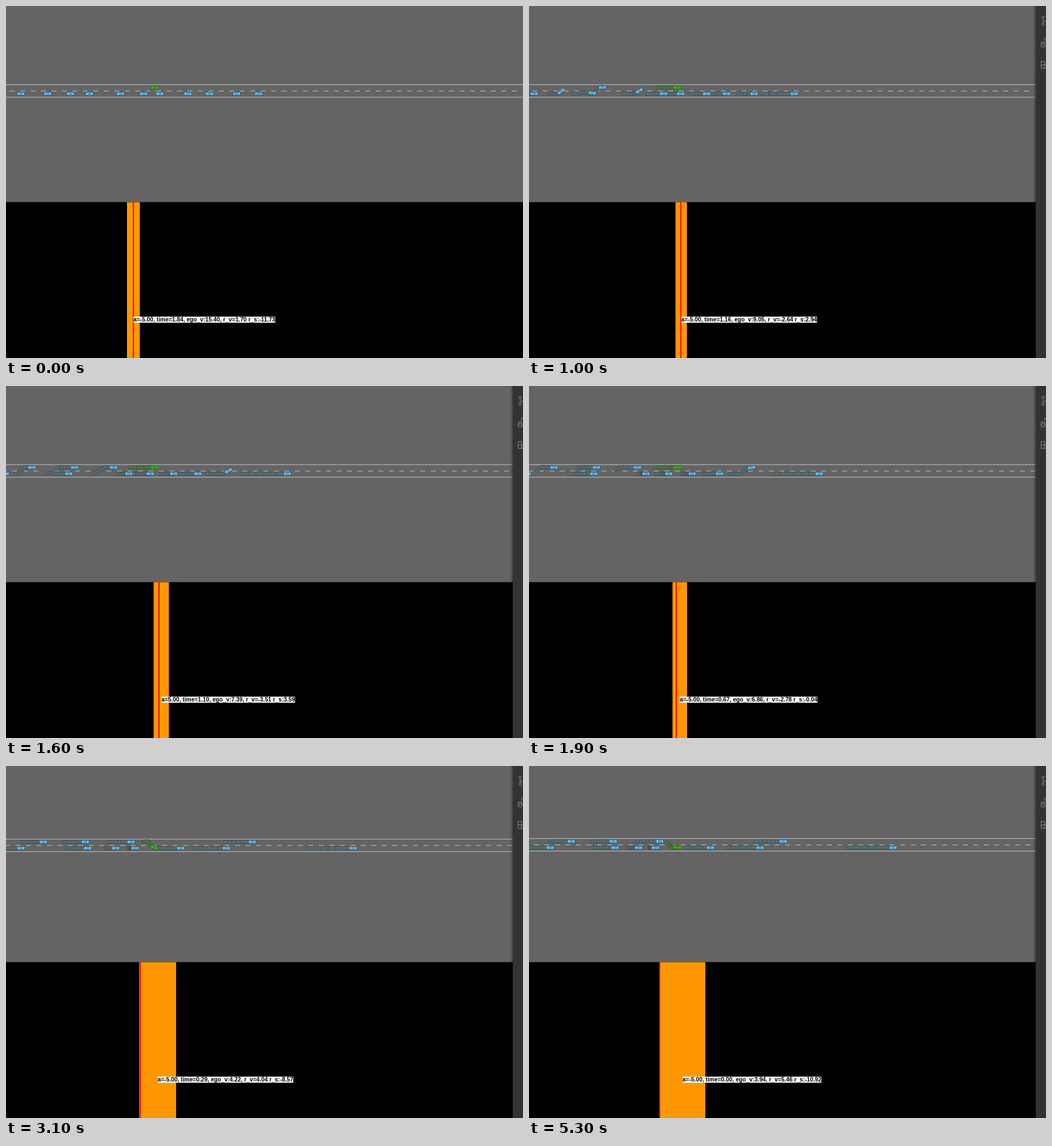
An HTML page with a canvas that plays this animation: 906 by 618 pixels, repeating every 5.4 s.

```html
<!DOCTYPE html>
<html lang="en">
<head>
<meta charset="utf-8">
<title>Lane change simulation</title>
<style>
html, body { margin: 0; width: 906px; height: 618px; overflow: hidden; background: #000; }
canvas { display: block; }
</style>
</head>
<body>
<canvas id="stage" width="906" height="618"></canvas>
<script>
const ctx = document.getElementById('stage').getContext('2d');
const LOOP = 5400, EGO_X = 260.3, EGO_Y = 143, TRAIL = 6;

const CLOCK = [400, 700, 1300, 1900, 2400, 2800, 3100, 3400, 3700];
const SIM = [0, 2, 7.3, 11.8, 15.8, 21.2, 22.7, 24.2, 25.7];

// Travel is keyed at KEYS, the ego's sideways shift at SHIFT_KEYS
const KEYS = [0, 2, 7.3, 11.8, 15.8, 25.7];
const EGO_TRAVEL = [0, 18, 55, 81, 99, 126];
const SHIFT_KEYS = [0, 15.8, 18, 19.7, 21.2, 22.7, 24.2, 25.7];
const EGO_SHIFT = [0, 0, 0, 4.5, 8, 9.8, 10.6, 10.7];

// x: place on screen at KEYS; moves: [start, end, sideways distance]
const CARS = [
  { x: [26, 17, 2.5, -3, 3, 37] },
  { x: [73, 65, 49, 44, 47, 74], moves: [[2.5, 7.7, 11]] },
  { x: [113, 114, 108.5, 113.5, 124.5, 151], moves: [[0.3, 2.2, 2], [2.6, 7.6, -2]] },
  { x: [146, 135, 124, 118, 120.5, 147.5], moves: [[0.2, 4.4, 11]] },
  { x: [200.5, 198.5, 189, 190, 197.5, 229], moves: [[2, 7.6, 11]] },
  { x: [241, 243, 226, 205, 194.5, 192] },
  { x: [269.5, 269.5, 260, 245, 237, 221.5] },
  { x: [318.5, 318.5, 302.5, 286, 282, 318] },
  { x: [356.5, 352, 341, 334, 344.5, 405] },
  { x: [404, 398, 392, 390, 400.5, 445.5], moves: [[7, 12.3, 11]] },
  { x: [442.5, 451.5, 479, 508.5, 541, 638] }
];

const HUD = {
  a: [-5, -5, 5, -5, -5, -5],
  time: [1.84, 0.77, 1.54, 0.67, 0.96, 0],
  v: [15.4, 10.18, 7.93, 6.86, 4.85, 3.94],
  rv: [1.7, -1.04, -4.24, -2.78, 0.78, 5.46],
  rs: [-11.73, -1.35, 7.22, -0.04, -3.18, -10.92],
  left: [212, 247.5, 266, 251.5, 243.5, 229],
  right: [234.5, 259.5, 294, 277, 273, 309],
  red: [223.2, 254, 278.2, 258, 250, 229]
};

function segment(keys, t) {
  let i = 0;
  while (i < keys.length - 2 && t >= keys[i + 1]) i++;
  return i;
}

function linear(keys, values, t) {
  const i = segment(keys, t);
  const f = Math.min(1, Math.max(0, (t - keys[i]) / (keys[i + 1] - keys[i])));
  return values[i] + (values[i + 1] - values[i]) * f;
}

function spline(keys, values, t) {
  const i = segment(keys, t), h = keys[i + 1] - keys[i], s = (t - keys[i]) / h;
  const slope = k => {
    const p = Math.max(0, k - 1), n = Math.min(keys.length - 1, k + 1);
    return (values[n] - values[p]) / (keys[n] - keys[p]);
  };
  const a = values[i], b = values[i + 1], q = 1 - s;
  return q * q * ((1 + 2 * s) * a + s * h * slope(i)) +
         s * s * ((3 - 2 * s) * b - q * h * slope(i + 1));
}

function smooth(a, b, t) {
  const s = Math.min(1, Math.max(0, (t - a) / (b - a)));
  return s * s * (3 - 2 * s);
}

const travel = t => spline(KEYS, EGO_TRAVEL, t);
const shift = t => spline(SHIFT_KEYS, EGO_SHIFT, t);
const egoPath = t => ({ x: EGO_X + travel(t), y: EGO_Y + shift(t) });
const carPath = car => t => ({
  x: spline(KEYS, car.x, t) + travel(t),
  y: 154 - (car.moves || []).reduce((y, [a, b, d]) => y + d * smooth(a, b, t), 0)
});
const VEHICLES = [
  ...CARS.map(car => ({ path: carPath(car), body: '#64c8ff', mid: '#4fa3d6', ghost: '#566d76' })),
  { path: egoPath, body: '#32c800', mid: '#2aa600', ghost: '#4d7740' }
];

function rect(color, x, y, w, h) {
  ctx.fillStyle = color;
  ctx.fillRect(x, y, w, h);
}

function drawCar(v, t, now, ghost) {
  const p = v.path(t), before = v.path(t - 0.1), after = v.path(t + 0.1);
  const dx = Math.max(0.3, after.x - before.x);
  ctx.save();
  ctx.translate(p.x - travel(now), p.y - shift(now));
  ctx.rotate(t > 0.1 ? Math.atan2(after.y - before.y, dx) : 0);
  rect(ghost ? v.ghost : v.body, -6.5, -2.8, 13, 5.6);
  if (!ghost) rect(v.mid, -3, -2.3, 6.5, 4.6);
  ctx.strokeStyle = ghost ? '#424d51' : '#3c4c55';
  ctx.lineWidth = 0.8;
  ctx.strokeRect(-6.5, -2.8, 13, 5.6);
  ctx.restore();
}

function drawRoad(t) {
  const dy = shift(t), gap = 55 / 3;
  rect('#646464', 0, 0, 906, 344.5);
  rect('#c8c8c8', 0, 137.6 - dy, 906, 1);
  rect('#c8c8c8', 0, 159.6 - dy, 906, 1);
  const start = (6.5 - travel(t)) % gap - gap;
  for (let x = start; x < 906; x += gap) rect('#c8c8c8', x, 148.7 - dy, 8.5, 1);
  for (const v of VEHICLES)
    for (let k = TRAIL; k > 0; k--) if (t - k >= -0.01) drawCar(v, t - k, t, true);
  for (const v of VEHICLES) drawCar(v, t, t, false);
}

function drawHud(t) {
  const at = name => linear(KEYS, HUD[name], t);
  const num = name => at(name).toFixed(2);
  const held = HUD.a[t >= 25.7 ? 5 : segment(KEYS, t)].toFixed(2);
  const left = at('left'), right = at('right'), x = (left + right) / 2;
  rect('#000', 0, 344.5, 906, 273.5);
  rect('#ff9800', left, 344.5, right - left, 273.5);
  rect('#ff0000', at('red') - 1, 344.5, 2, 273.5);
  const text = `a=${held}, time=${num('time')}, ego_v:${num('v')}, r_v=${num('rv')} r_s:${num('rs')}`;
  ctx.font = 'bold 10.22px "Liberation Sans", Arial, sans-serif';
  rect('#fff', x, 545.4, ctx.measureText(text).width, 10.6);
  ctx.fillStyle = '#000';
  ctx.fillText(text, x, 554);
}

function drawSidebar() {
  const shade = ctx.createLinearGradient(883, 0, 888, 0);
  shade.addColorStop(0, 'rgba(0,0,0,0)');
  shade.addColorStop(1, 'rgba(0,0,0,.3)');
  rect(shade, 883, 0, 5, 618);
  rect('#333', 888, 0, 18, 618);
  ctx.strokeStyle = '#8a8a8a';
  ctx.lineWidth = 1;
  // branch, bug and blocks, cut by the stage edge
  ctx.stroke(new Path2D(`M903.2 20a2.2 2.2 0 1 1-4.4 0a2.2 2.2 0 1 1 4.4 0
    M903.2 32a2.2 2.2 0 1 1-4.4 0a2.2 2.2 0 1 1 4.4 0M901 22.3V29.7M901 29q0-2.5 5-2.5
    M903.5 61V56l3 2M898.3 66q0-3.5 2.7-3.5t2.7 3.5v3q0 3-2.7 3t-2.7-3z
    M898.3 66h5.4M896.5 63l2 1.5M896 68h2.3M896.5 72l2-1.5M903.7 64.5l2-1.5M903.7 68h2.3M903.7 70.5l2 1.5
    M897.5 97.5h6v6h-6zM897.5 103.5h6v6h-6zM903.5 103.5h4v6h-4z`));
}

function drawPointer(x, y) {
  const arrow = new Path2D('M.5.5v8l1.9-1.7 1.2 2.7 1.3-.6-1.2-2.6h2.5z');
  ctx.save();
  ctx.translate(x, y);
  ctx.fillStyle = '#000';
  ctx.strokeStyle = '#fff';
  ctx.lineWidth = 0.8;
  ctx.fill(arrow);
  ctx.stroke(arrow);
  ctx.restore();
}

function simTime(ms) {
  if (ms < 500) return 0;
  if (ms < 2400) return linear(CLOCK, SIM, Math.floor(ms / 100) * 100);
  return SIM[CLOCK.filter(c => c <= ms).length - 1];
}

function draw(now) {
  const ms = now % LOOP, t = simTime(ms);
  drawRoad(t);
  drawHud(t);
  if (ms >= 300) drawSidebar();
  if (ms >= 5300) return;
  if (ms >= 5000) drawPointer(42, 6);
  else if (ms >= 4600) drawPointer(215, 51);
  else if (ms >= 4300) drawPointer(506, 53);
}

let origin;
function tick(now) {
  origin ??= now;
  draw(now - origin);
  requestAnimationFrame(tick);
}
requestAnimationFrame(tick);
</script>
</body>
</html>
```
